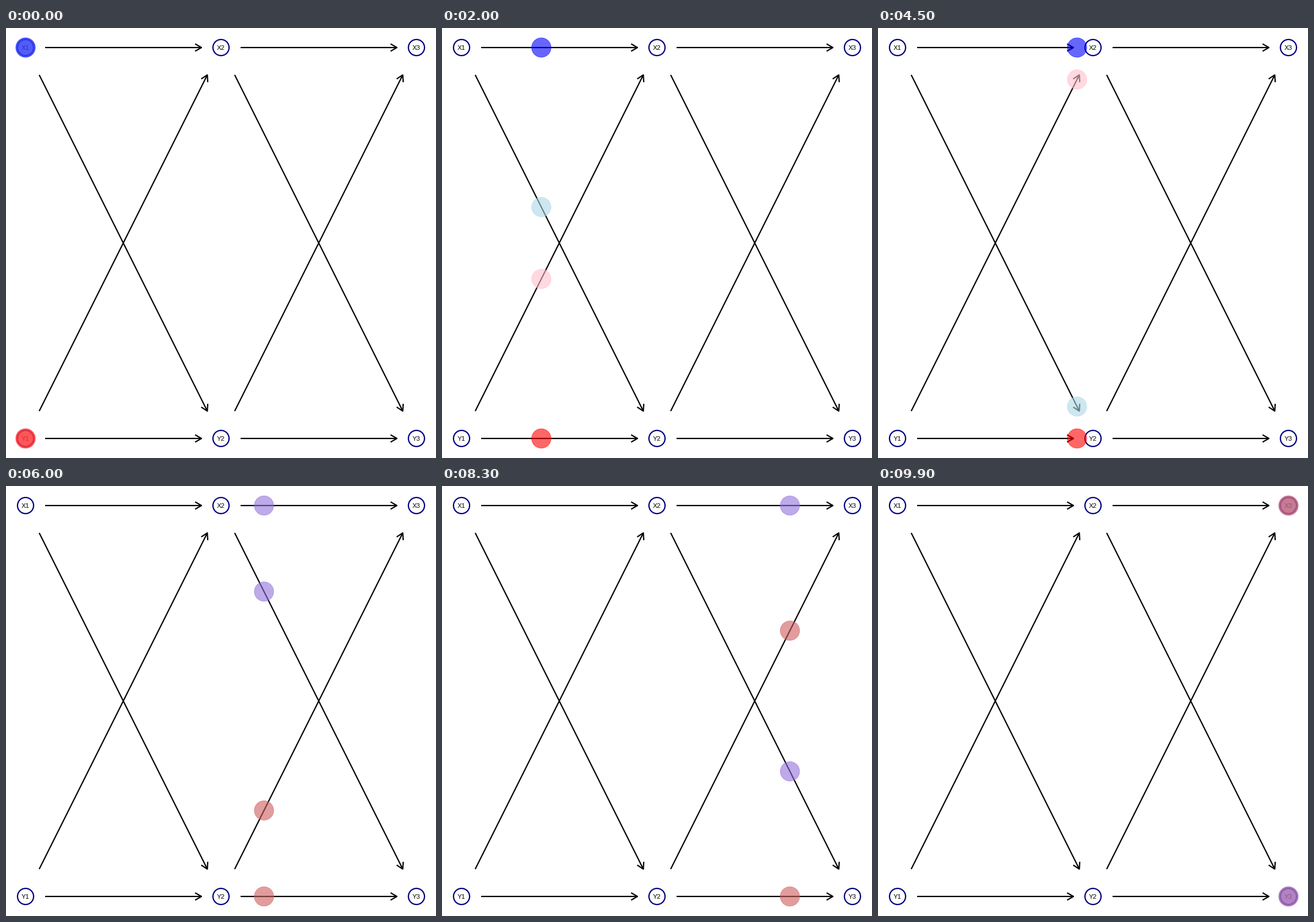
A matplotlib script that plays this animation: 748 px wide and 748 px high, repeating every 10000 ms.

```python
import numpy as np
import matplotlib.pyplot as plt
from matplotlib.animation import FuncAnimation
from matplotlib.patches import Circle

SIZE, DPI = 748, 64
PT = 72 / DPI  # points per pixel
FRAMES, MID = 100, 49
COLS = (34, 374, 714)
ROWS = {"X": 34, "Y": 714}
LINE = 2.2
HEAD = 12.7

plt.rcParams["font.family"] = "Liberation Sans"
fig = plt.figure(figsize=(SIZE / DPI, SIZE / DPI), dpi=DPI, facecolor="white")
ax = fig.add_axes([0, 0, 1, 1])
ax.set_xlim(0, SIZE)
ax.set_ylim(SIZE, 0)
ax.axis("off")


def point(row, col):
    return np.array([COLS[col], ROWS[row]], float)


def stroke(points):
    xs, ys = zip(*points)
    ax.plot(xs, ys, color="black", lw=LINE * PT, solid_capstyle="butt",
            solid_joinstyle="round", snap=False, zorder=1)


def arrow(start, end, gap):
    a = start + gap * (end - start)
    b = end - gap * (end - start)
    stroke([a, b])
    angle = np.arctan2(b[1] - a[1], b[0] - a[0])
    wings = [b - HEAD * np.array([np.cos(t), np.sin(t)])
             for t in (angle - np.pi / 6, angle + np.pi / 6)]
    stroke([wings[0], b, wings[1]])


def node(row, col):
    x, y = point(row, col)
    ax.add_patch(Circle((x, y), 14, fc="white", ec="navy", lw=LINE * PT, zorder=2))
    ax.text(x, y + 4.1, f"{row}{col + 1}", size=11.4 * PT, ha="center",
            va="baseline", color="black", zorder=3)


def dot(stage, src, dst, color):
    patch = Circle(point(src, stage), 16.9, fc=color, ec=color, alpha=0.6,
                   lw=0.8 * PT, zorder=4)
    ax.add_patch(patch)
    return patch, stage, point(src, stage), point(dst, stage + 1)


for step in (0, 1):
    for src in "XY":
        for dst in "XY":
            arrow(point(src, step), point(dst, step + 1), 0.1 if src == dst else 0.07)
for row in "XY":
    for col in range(3):
        node(row, col)

dots = [
    dot(0, "X", "Y", "lightblue"),
    dot(0, "Y", "X", "pink"),
    dot(0, "X", "X", "blue"),
    dot(0, "Y", "Y", "red"),
    dot(1, "X", "X", "mediumpurple"),
    dot(1, "Y", "Y", "indianred"),
    dot(1, "X", "Y", "mediumpurple"),
    dot(1, "Y", "X", "indianred"),
]


def update(i):
    progress = (i / MID, (i - MID) / (FRAMES - 1 - MID))
    for patch, stage, start, end in dots:
        t = progress[stage]
        patch.set_visible(0 <= t <= 1)
        patch.set_center(start + t * (end - start))
    return [d[0] for d in dots]


anim = FuncAnimation(fig, update, frames=FRAMES, interval=100,
                     repeat=True, repeat_delay=0, blit=False)
plt.show()
```
